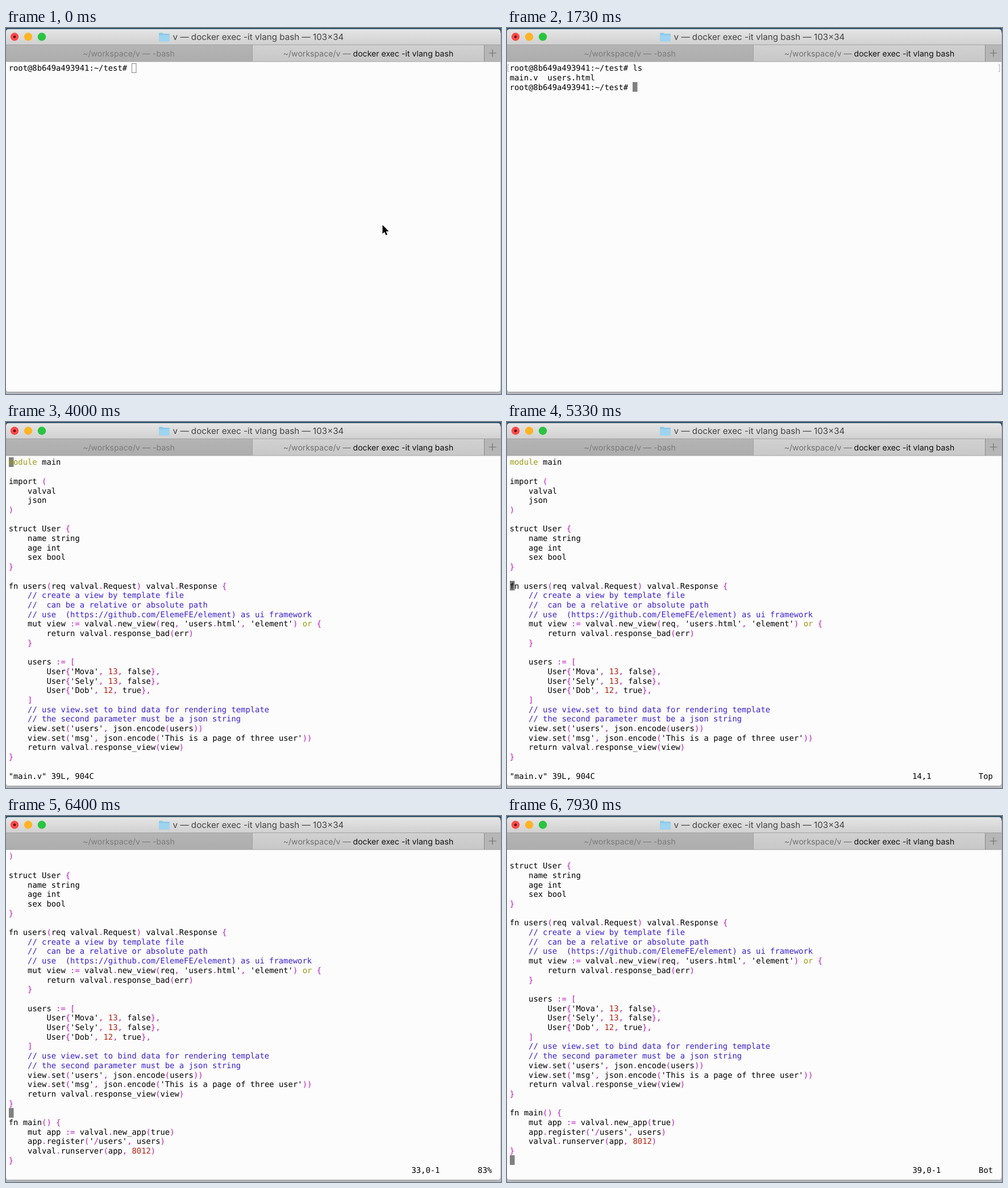
Recreate the animation shown at these times as an HTML page. Size 871 px wide and 643 px high, loop 8000 ms.

```html
<!DOCTYPE html>
<html lang="en">
<head>
<meta charset="utf-8">
<title>Terminal session</title>
<style>
  html, body { margin: 0; width: 100%; height: 100%; overflow: hidden; background: #b4b7bb; }
  svg { display: block; width: 871px; height: 643px; }
  text { white-space: pre; text-rendering: geometricPrecision; }
  .ui { font-family: Inter, Roboto, sans-serif; text-anchor: middle; }
  .term { font: 13.85px "DejaVu Sans Mono", "Liberation Mono", monospace; fill: #000; }
  .term text { stroke: currentColor; stroke-width: 0; }
  .comment { fill: #3b21cb; }
  .keyword { fill: #999a12; }
  .number { fill: #b4200f; }
  .operator { fill: #bf1cbf; }
  .mark { fill: none; stroke: #a9a9a9; stroke-width: 1; }
</style>
</head>
<body>
<svg viewBox="0 0 871 643">
  <defs>
    <linearGradient id="bar" x2="0" y2="1">
      <stop offset="0" stop-color="#e5e5e5"/><stop offset="1" stop-color="#d0d0d0"/>
    </linearGradient>
    <linearGradient id="idle" x2="0" y2="1">
      <stop offset="0" stop-color="#b4b4b4"/><stop offset="1" stop-color="#adadad"/>
    </linearGradient>
    <linearGradient id="active" x2="0" y2="1">
      <stop offset="0" stop-color="#d1d1d1"/><stop offset="1" stop-color="#c8c8c8"/>
    </linearGradient>
  </defs>

  <rect width="871" height="643" fill="#b4b7bb"/>
  <rect width="871" height="12" fill="#31566e"/>
  <path d="M0 30V7Q0 2 5 2H865Q870 2 870 7V30Z" fill="url(#bar)"/>
  <path d="M0 59H870V634Q870 639 865 639H5Q0 639 0 634Z" fill="#fcfcfc"/>
  <path d="M4 639.5H866" stroke="#989a9d"/>
  <path d="M870.5 8V636" stroke="#b5b5b5"/>

  <circle cx="15" cy="15.5" r="7.2" fill="#fb4a48"/>
  <circle cx="15" cy="15.5" r="2.2" fill="#5c0606"/>
  <circle cx="39" cy="15.5" r="7.2" fill="#fdb425"/>
  <circle cx="63" cy="15.5" r="7.2" fill="#29c440"/>
  <path d="M269 10Q269 8.500 270.500 8.500H275L277 10H286.500Q288 10 288 11.500V22Q288 23.500 286.500 23.500H270.500Q269 23.500 269 22Z" fill="#8cc8e8"/>
  <path d="M269 12.500H288V22Q288 23.500 286.500 23.500H270.500Q269 23.500 269 22Z" fill="#9dd4f0"/>
  <text class="ui" x="444" y="21.300" font-size="15.200" fill="#444">v — docker exec -it vlang bash — 103×34</text>

  <rect y="30" width="433" height="29" fill="url(#idle)"/>
  <rect x="434" y="30" width="407" height="29" fill="url(#active)"/>
  <rect x="842" y="30" width="28" height="29" fill="#b6b6b6"/>
  <path d="M0 29.500H870M0 59H870M433.500 30V59" stroke="#a2a2a2"/>
  <path d="M841.500 30V59" stroke="#8c8c8c"/>
  <path d="M849.500 44H862.500M856 37.500V50.500" stroke="#707070" stroke-width="1.200"/>
  <text class="ui" x="216" y="49.500" font-size="14.100" fill="#7c7c7c">~/workspace/v — -bash</text>
  <text class="ui" x="637.500" y="49.500" font-size="14.100" fill="#707070">~/workspace/v — <tspan fill="#111">docker exec -it vlang bash</tspan></text>

  <rect id="cursor"/>
  <g id="screen" class="term"></g>
  <path id="pointer" d="M662.500 346V361.500L666 358.200L668.500 364L671 362.900L668.600 357.300H673.500Z"
        fill="#000" stroke="#fff" stroke-width="1.200" paint-order="stroke"/>
</svg>

<script>
const LOOP = 8000;
const CELL_W = 8.338, ROW_H = 16.7, LEFT = 4.7, TOP = 62;
const PROMPT = 'root@8b649a493941:~/test# ';

const FILE = `module main

import (
    valval
    json
)

struct User {
    name string
    age int
    sex bool
}

fn users(req valval.Request) valval.Response {
    // create a view by template file
    //  can be a relative or absolute path
    // use  (https://github.com/ElemeFE/element) as ui framework
    mut view := valval.new_view(req, 'users.html', 'element') or {
        return valval.response_bad(err)
    }

    users := [
        User{'Mova', 13, false},
        User{'Sely', 13, false},
        User{'Dob', 12, true},
    ]
    // use view.set to bind data for rendering template
    // the second parameter must be a json string
    view.set('users', json.encode(users))
    view.set('msg', json.encode('This is a page of three user'))
    return valval.response_view(view)
}

fn main() {
    mut app := valval.new_app(true)
    app.register('/users', users)
    valval.runserver(app, 8012)
}
`.split('\n');

// Shell input: [time, typed text]; ENTER runs the command.
const FIRST = [[1070, 'l'], [1200, 'ls']];
const SECOND = [[2130, 'v'], [2270, 'vi'], [2400, 'vim'], [2530, 'vim '],
                [2670, 'vim m'], [2800, 'vim ma'], [3000, 'vim main.v ']];
const FOCUS = 470, ENTER_LS = 1530, ENTER_VIM = 3270, EDITOR = 3670;

// Editor: one key press, then held down at a steady repeat.
const FIRST_DOWN = 4270, REPEAT_FROM = 4633, REPEAT = 56;
const RULER_FROM = 4070, VIEW = 33, SCROLL_OFF = 5;

const clamp = (v, lo, hi) => Math.max(lo, Math.min(hi, v));
const typed = (steps, t) => steps.reduce((text, [at, s]) => t >= at ? s : text, '');

function shellState(t) {
  const done = t >= ENTER_LS;
  const rows = [PROMPT + typed(FIRST, t)];
  if (done) rows.push('main.v  users.html', PROMPT + typed(SECOND, t));
  const marks = [];
  if (done) marks.push(0);
  if (t >= ENTER_VIM) marks.push(2);
  const row = rows.length - 1;
  return { rows, marks, row, col: rows[row].length,
           solid: t >= FOCUS, pointer: t < FIRST[0][0], code: false };
}

function editorState(t) {
  const last = FILE.length;
  let line = t < FIRST_DOWN ? 1 : 2;
  if (t >= REPEAT_FROM) line = clamp(2 + Math.floor((t - REPEAT_FROM) / REPEAT), 2, last);
  const maxTop = last - VIEW + 1;
  const top = clamp(line + SCROLL_OFF - VIEW + 1, 1, maxTop);
  const where = top === 1 ? 'Top' : top === maxTop ? 'Bot'
    : Math.floor((top - 1) / (maxTop - 1) * 100) + '%';
  const position = line + (FILE[line - 1] ? ',1' : ',0-1');
  const message = top === 1 ? '"main.v" 39L, 904C' : '';
  const ruler = t >= RULER_FROM ? position.padEnd(14) + where : '';
  const rows = FILE.slice(top - 1, top - 1 + VIEW);
  rows.push(message.padEnd(85) + ruler);
  return { rows, marks: [], row: line - top, col: 0, solid: true, pointer: false, code: true };
}

const SVG_NS = document.querySelector('svg').namespaceURI;
function make(name, attrs, parent, text) {
  const el = document.createElementNS(SVG_NS, name);
  for (const key in attrs) el.setAttribute(key, attrs[key]);
  if (text) el.textContent = text;
  parent.append(el);
  return el;
}

const TOKENS = /(\/\/.*)|\b(module|or)\b|\b(\d+)\b|([&|~><!()*#%@+\/=?:;}{,.^\-[\]]+)/g;
const KINDS = ['comment', 'keyword', 'number', 'operator'];

function drawRow(text, row, code, parent) {
  const y = Math.round(75.4 + row * ROW_H);
  const put = (s, col, kind) => {
    const lead = s.length - s.trimStart().length;
    if (s.trim()) make('text', { x: LEFT + (col + lead) * CELL_W, y, class: kind }, parent, s.trim());
  };
  let at = 0;
  if (code) for (const match of text.matchAll(TOKENS)) {
    put(text.slice(at, match.index), at, '');
    put(match[0], match.index, KINDS[match.slice(1).findIndex(Boolean)]);
    at = match.index + match[0].length;
  }
  put(text.slice(at), at, '');
}

const screen = document.getElementById('screen');
const cursor = document.getElementById('cursor');
const pointer = document.getElementById('pointer');

function draw({ rows, marks, row, col, solid, pointer: shown, code }) {
  screen.replaceChildren();
  rows.forEach((text, i) => drawRow(text, i, code && i < VIEW, screen));
  for (const i of marks) {
    const y = Math.round(TOP + i * ROW_H) + 2.5;
    make('path', { class: 'mark', d: `M4 ${y}H1.500V${y + 12}H4M864.500 ${y}H867V${y + 12}H864.500` }, screen);
  }
  const x = Math.round(LEFT + col * CELL_W), y = Math.round(TOP + row * ROW_H);
  const inset = solid ? 0 : 0.5;
  const box = { x: x + inset, y: y + inset, width: 8.5 - inset * 2, height: 17 - inset * 2,
                fill: solid ? '#808080' : 'none', stroke: solid ? 'none' : '#858585' };
  for (const key in box) cursor.setAttribute(key, box[key]);
  pointer.style.display = shown ? '' : 'none';
}

let drawn = '';
const start = performance.now();
function frame() {
  const t = (performance.now() - start) % LOOP;
  const state = t < EDITOR ? shellState(t) : editorState(t);
  const key = JSON.stringify(state);
  if (key !== drawn) draw(state);
  drawn = key;
  requestAnimationFrame(frame);
}
frame();
</script>
</body>
</html>
```
